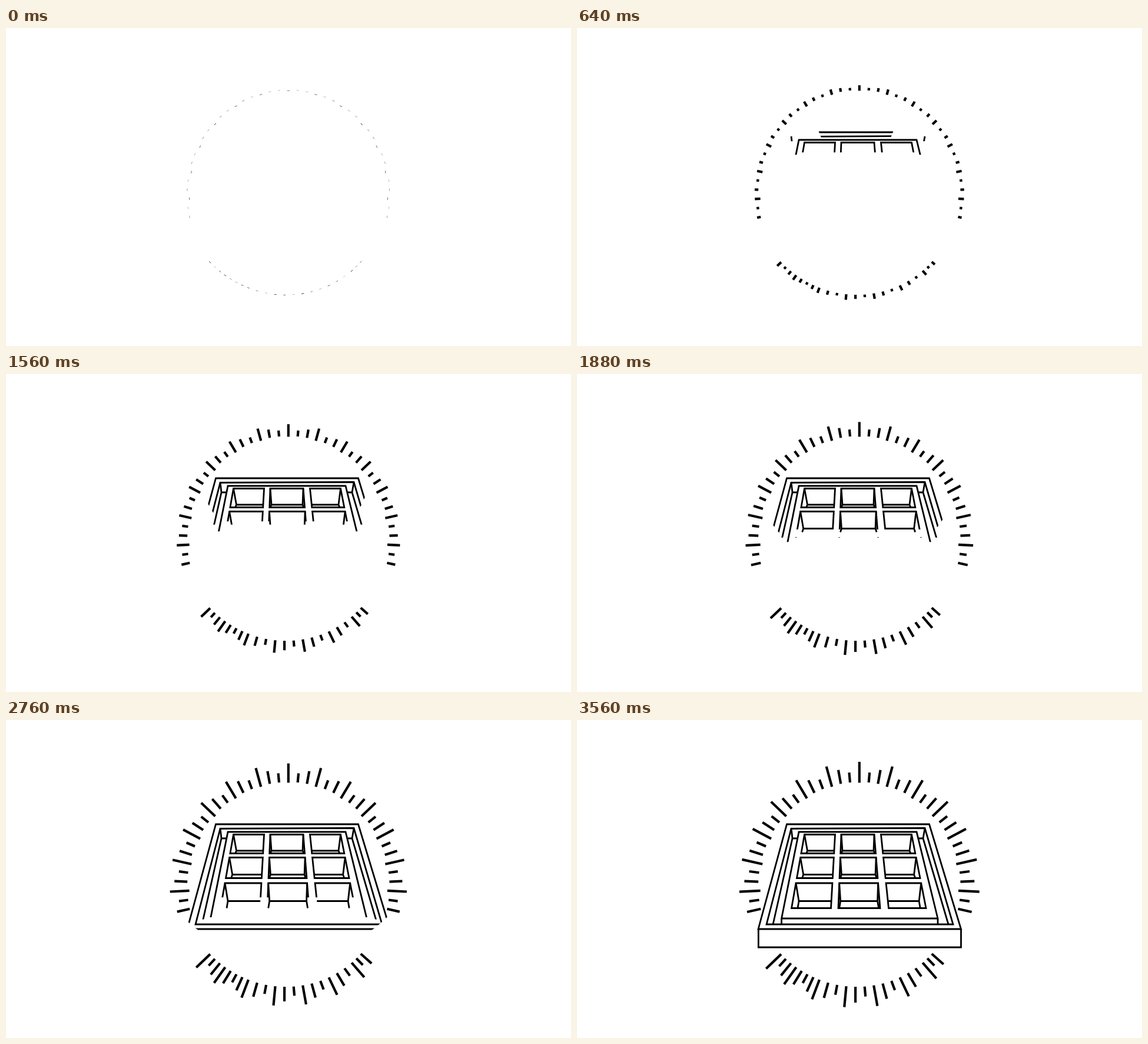
An HTML page with a canvas that plays this animation: 960 by 540 pixels, repeating every 4.24 s.

```html
<!DOCTYPE html>
<html lang="en">
<head>
<meta charset="utf-8">
<title>Tray and rays</title>
<style>
  html, body { margin: 0; height: 100%; overflow: hidden; background: #fff; }
  canvas { display: block; }
</style>
</head>
<body>
<canvas id="stage" width="960" height="540"></canvas>
<script>
const ctx = document.getElementById('stage').getContext('2d');
const LOOP = 4240, STEP = 40, DRAW_END = 3560;
const RAY_GAP = 5.15; // degrees
const rays = [];

// Angles are in degrees, clockwise from the top.
function addRay(cy, angle, tilt, radius, length) {
  const rad = Math.PI / 180, a = angle * rad, b = (angle + tilt) * rad;
  rays.push({
    x: 479.8 + radius * Math.sin(a), y: cy - radius * Math.cos(a),
    dx: length * Math.sin(b), dy: -length * Math.cos(b)
  });
}

// Upper arc: a slightly squashed ring of long, short and middle rays.
for (let i = -20; i <= 20; i++) {
  const kind = Math.abs(i) % 3;
  const angle = i * RAY_GAP;
  const side = Math.sin(angle * Math.PI / 180) ** 2;
  const radius = kind ? 176.6 - 4.8 * side : 175.4 - 7 * side;
  addRay(282, angle, 0, radius, [35.7, 17, 23.8][kind]);
}

// Lower arc, right to left: denser at both ends, drifting outward.
const lengths = { S: 17, M: 26.8, L: 35.5 };
[...'MSLSMLSMLSMLSMLMSMLMSL'].forEach((kind, i) => {
  const squeeze = 1.5 * (Math.max(0, i - 14) - Math.max(0, 2 - i));
  const angle = 130.7 + i * RAY_GAP - squeeze;
  addRay(279.5, angle, -2, 170 + 0.37 * i, lengths[kind]);
});

const rims = new Path2D('M356.5 177H598.5L652.5 355H308ZM364 184.5L591 183.5L639 347H322Z');
const front = new Path2D('M308.3 355V386H652.5V355');
const panel = new Path2D('M377 190H577L613 337H347.5ZM347.5 337V347M613 337V347');
const depth = new Path2D('M364 184L366 201H374M366 201L333 347M591 184L588 201H581M588 201L631 347');
const cells = new Path2D();

function addLine(path, ...points) {
  points.forEach(([x, y], i) => i ? path.lineTo(x, y) : path.moveTo(x, y));
}

// Column edges run from y = 194.5 to y = 319.5; a lean marks a visible side wall.
const edges = [
  { top: 386.5, bottom: 364.5, lean: 5 }, { top: 438.5, bottom: 431.5 },
  { top: 449, bottom: 444, lean: 2 }, { top: 505, bottom: 515, lean: -1 },
  { top: 516.5, bottom: 529.5 }, { top: 568.5, bottom: 593, lean: -3.5 }
];
const edgeX = (edge, y) => edge.top + (edge.bottom - edge.top) * (y - 194.5) / 125;

for (const [top, floor, bottom] of [[194.5, 222, 226.5], [233.5, 262.5, 268.5], [277, 307.5, 319.5]]) {
  for (let col = 0; col < 3; col++) {
    const [left, right] = edges.slice(2 * col, 2 * col + 2);
    addLine(cells, [edgeX(left, top), top], [edgeX(right, top), top],
      [edgeX(right, bottom), bottom], [edgeX(left, bottom), bottom]);
    cells.closePath();
    const corners = [left, right].map(edge => {
      if (!edge.lean) return [edgeX(edge, floor), floor];
      const x = edgeX(edge, top), corner = x + edge.lean;
      addLine(depth, [x, top], [corner, floor], [corner + (edge === left ? -2 : 2), bottom]);
      return [corner, floor];
    });
    addLine(depth, ...corners);
  }
}

function strokeInside(path, mask) {
  ctx.save();
  ctx.beginPath();
  mask();
  ctx.clip();
  ctx.stroke(path);
  ctx.restore();
}

const wipe = (path, bottom) => strokeInside(path, () => ctx.rect(0, 0, 960, bottom));

function draw(t) {
  ctx.clearRect(0, 0, 960, 540);
  const p = Math.min(1, (t + STEP) / (DRAW_END + STEP));
  const grow = 1.4 * p - 0.4 * p ** 3.5;

  ctx.lineWidth = 4.2;
  ctx.beginPath();
  for (const { x, y, dx, dy } of rays) {
    ctx.moveTo(x, y);
    ctx.lineTo(x + dx * grow, y + dy * grow);
  }
  ctx.stroke();

  ctx.lineWidth = 2.8;
  strokeInside(rims, () => ctx.arc(474, 155, 11.3 + 0.0865 * t, 0, 2 * Math.PI));
  wipe(panel, 179 + 0.0565 * t);
  wipe(cells, 184 + 0.0425 * t);
  wipe(depth, 148 + 0.069 * t);
  wipe(front, 179 + 0.0588 * t);
}

const start = performance.now();
function tick() {
  const t = (performance.now() - start) % LOOP;
  draw(Math.min(DRAW_END, Math.floor(t / STEP) * STEP));
  requestAnimationFrame(tick);
}
tick();
</script>
</body>
</html>
```
